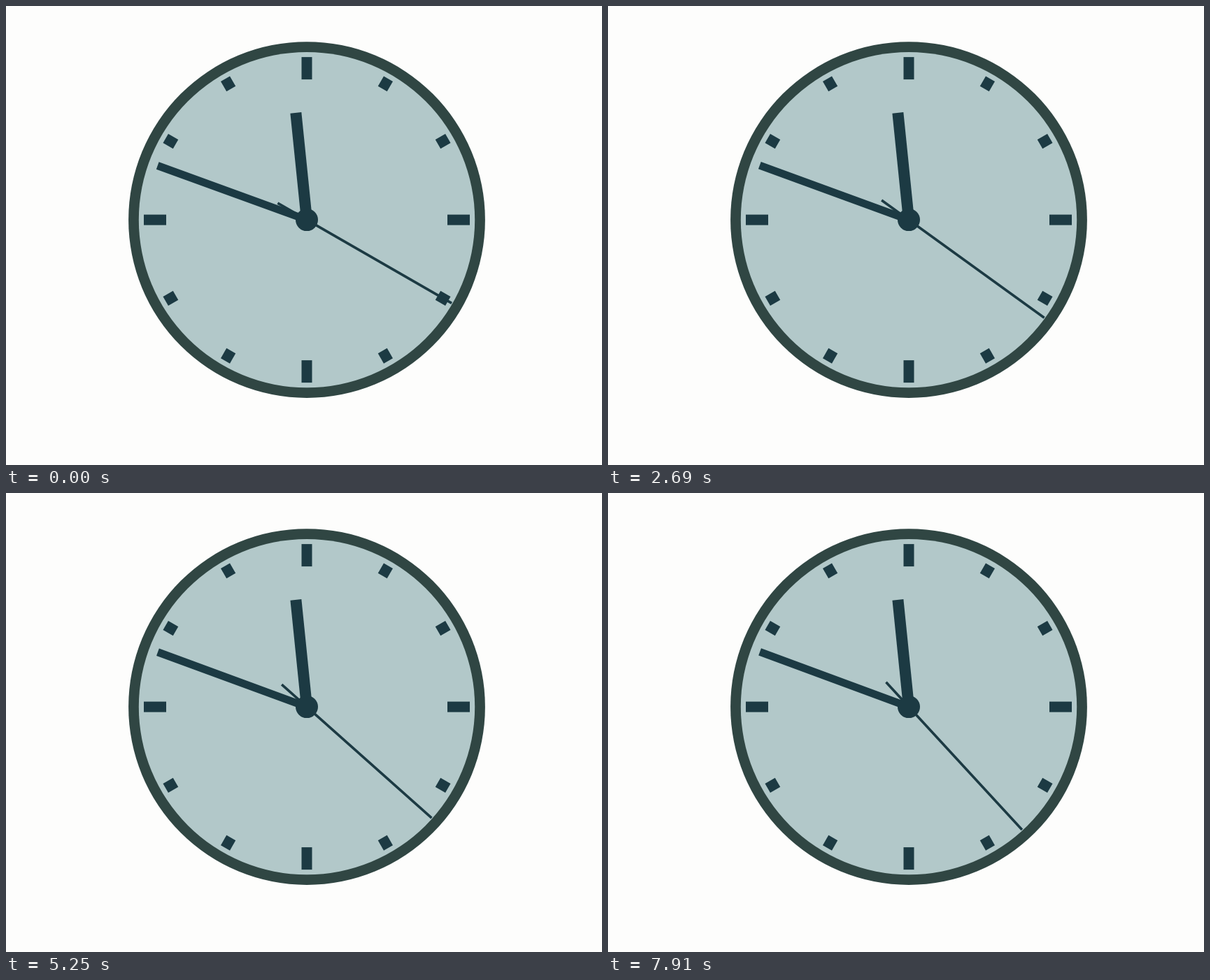
Recreate the animation shown at these times as an HTML page with a canvas. Size 852 px wide and 657 px high, loop 8 s.

```html
<!DOCTYPE html>
<html lang="en">
<head>
<meta charset="utf-8">
<title>Clock</title>
<style>
  html, body { margin: 0; width: 100%; height: 100%; overflow: hidden; background: #fdfdfc; }
  canvas { display: block; }
</style>
</head>
<body>
<canvas id="stage" width="852" height="657"></canvas>
<script>
const ctx = document.getElementById('stage').getContext('2d');
const LOOP = 8000;
const PAPER = '#fdfdfc', FACE = '#b2c8c9', RIM = '#304643', INK = '#1c3a43';
const STEPS_PER_TICK = 60;
const DECAY = 0.78;

// Steps come in uneven groups of three: 20, 20 and 100 ms.
function stepAt(ms) {
  const t = ms - 30;
  const group = Math.floor(t / 140);
  return group * 3 + Math.min(2, Math.floor((t - group * 140) / 20));
}

// Each tick closes the gap to the next second exponentially.
function secondsAt(ms) {
  const step = stepAt(ms) + 19;
  const tick = Math.floor(step / STEPS_PER_TICK);
  return 20 + tick - DECAY ** (step - tick * STEPS_PER_TICK);
}

// A bar along a radius; the angle runs clockwise from twelve o'clock.
function bar(degrees, from, to, width) {
  ctx.save();
  ctx.rotate(degrees * Math.PI / 180);
  ctx.fillStyle = INK;
  ctx.fillRect(-width / 2, -to, width, to - from);
  ctx.restore();
}

function disc(radius, color) {
  ctx.fillStyle = color;
  ctx.beginPath();
  ctx.arc(0, 0, radius, 0, Math.PI * 2);
  ctx.fill();
}

function draw(ms) {
  const seconds = secondsAt(ms);
  const minutes = 48 + seconds / 60;
  const hours = 11 + minutes / 60;

  ctx.setTransform(1, 0, 0, 1, 0, 0);
  ctx.fillStyle = PAPER;
  ctx.fillRect(0, 0, 852, 657);
  ctx.translate(430, 306.1);

  disc(254.9, RIM);
  disc(240.2, FACE);
  for (let h = 0; h < 12; h++) {
    bar(h * 30, h % 3 === 0 ? 201 : 216.5, 233, 15);
  }

  bar(hours * 30, 0, 154, 16);
  bar(minutes * 6, 0, 227, 11);
  bar(seconds * 6, -48, 239, 3.6);
  disc(16, INK);
}

function frame() {
  draw(performance.now() % LOOP);
  requestAnimationFrame(frame);
}
frame();
</script>
</body>
</html>
```
